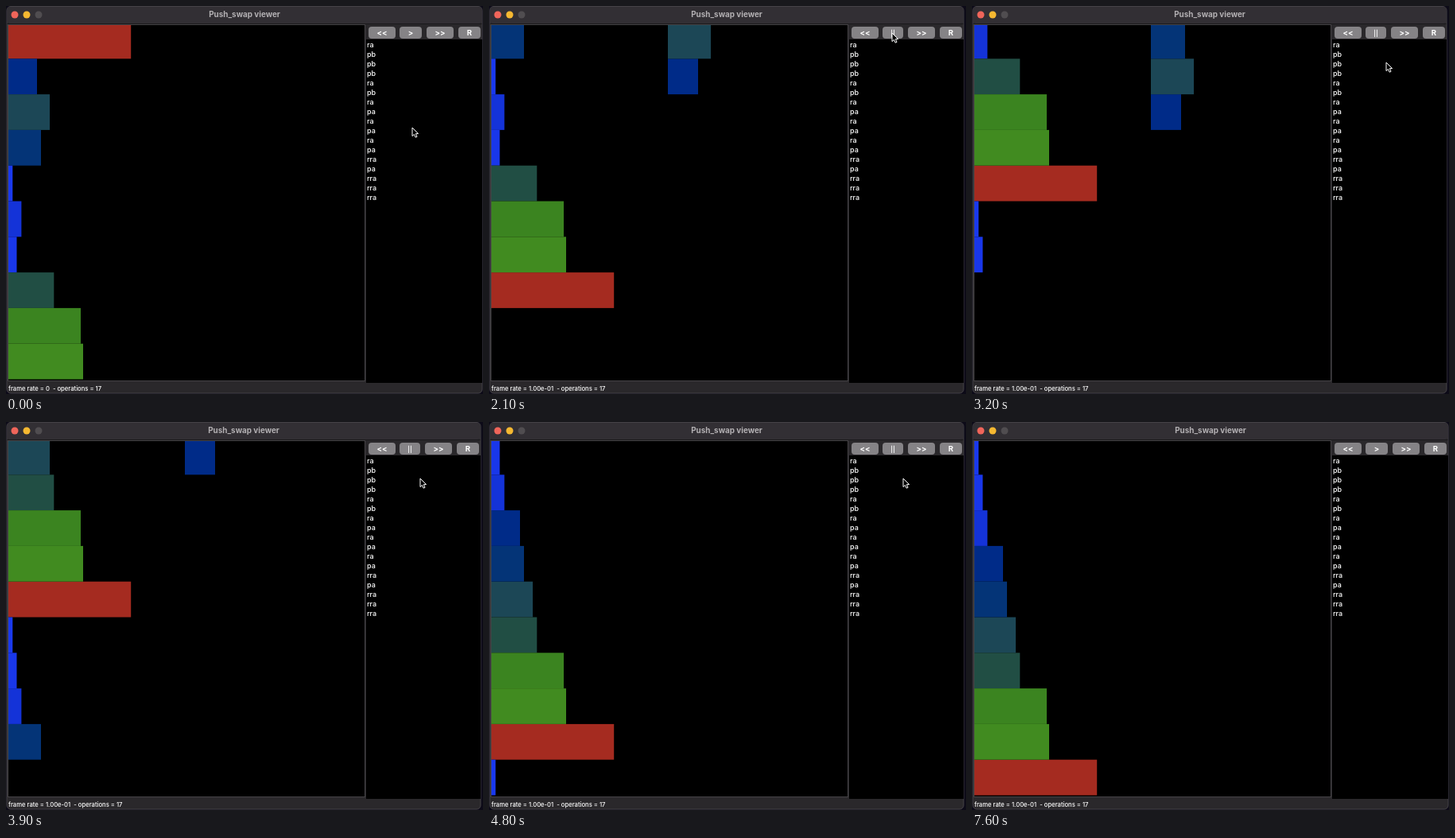
Recreate the animation shown at these times as an HTML page. Size 600x488 px, loop 7700 ms.

```html
<!DOCTYPE html>
<html lang="en">
<head>
<meta charset="utf-8">
<title>Push_swap viewer</title>
<style>
  html, body { margin: 0; width: 100%; height: 100%; overflow: hidden; background: #0d0b18; }
  svg { display: block; width: 600px; height: 488px; }
  text { font-family: Inter, Roboto, sans-serif; fill: #fff; white-space: pre; }
  .title { font-size: 9.9px; font-weight: 700; fill: #b3b0b3; text-anchor: middle; }
  .label { font-size: 9.6px; font-weight: 700; text-anchor: middle; }
  .pause { font-size: 7.8px; font-weight: 600; }
  .op { font-size: 9px; font-weight: 500; }
  .status { font-size: 7.65px; font-weight: 500; }
</style>
</head>
<body>
<svg id="stage" viewBox="0 0 600 488"></svg>
<script>
const LOOP = 7700, STEP = 100;
const CLICK = 1500, DONE = 4930;
const FIRST_OP = 1560, OP_GAP = 210;
const ROW = 44.8;

// Bar width and colour, in starting order from the top.
const BARS = [
  [156.2, '#a52b20'], [38, '#002b88'], [54, '#1c4756'], [43, '#043477'], [7.3, '#1a39ee'],
  [18.4, '#1433d8'], [12.5, '#1937ea'], [59.3, '#214e44'], [93, '#3b8420'], [96, '#418b20']
];
const OPS = 'ra pb pb pb ra pb ra pa ra pa ra pa rra pa rra rra rra'.split(' ');

// Cursor path: time, x, y.
const CURSOR = [
  [0, 511, 153], [300, 511, 153], [1000, 507, 34], [2300, 507, 34],
  [2900, 521, 71], [5500, 521, 71], [6200, 540, -16], [LOOP, 540, -16]
];

const stage = document.getElementById('stage');

function add(tag, attrs, parent = stage, text) {
  const el = document.createElementNS('http://www.w3.org/2000/svg', tag);
  set(el, attrs);
  if (text) el.textContent = text;
  return parent.appendChild(el);
}
function set(el, attrs) {
  for (const k in attrs) el.setAttribute(k, attrs[k]);
}
function box(x, y, width, height, fill, more) {
  return add('rect', { x, y, width, height, fill, ...more });
}

// Every state of the two stacks, one per operation.
function runOps() {
  let a = BARS.map((_, i) => i), b = [];
  const states = [{ a, b }];
  for (const op of OPS) {
    a = [...a];
    b = [...b];
    if (op === 'ra') a.push(a.shift());
    if (op === 'rra') a.unshift(a.pop());
    if (op === 'pb') b.unshift(a.shift());
    if (op === 'pa') a.unshift(b.shift());
    states.push({ a, b });
  }
  return states;
}
const states = runOps();

// Window frame
const frame = box(1, 0.5, 598, 486.5, '#2a282b', { rx: 5, stroke: '#454247' });
const titleBar = box(1.5, 1, 597, 21, '#322f34', { rx: 4 });
const titleLine = box(1.5, 22, 597, 1, '#1a191b');
['#f0655a', '#f5b831', '#504d50'].forEach((fill, i) =>
  add('circle', { cx: 11 + 15 * i, cy: 11, r: 4.5, fill }));
const title = add('text', { y: 14.3, class: 'title' }, stage, 'Push_swap viewer');

// Stack view and its bars
box(2, 23, 450, 449, '#454346');
box(3, 24, 448, 447, '#000');
const clip = add('clipPath', { id: 'view' });
add('rect', { x: 3, y: 24, width: 448, height: 447 }, clip);
const barLayer = add('g', { 'clip-path': 'url(#view)' });
const bars = BARS.map(([width, fill]) =>
  add('rect', { width, height: ROW, fill }, barLayer));

// Operation list
const list = box(453, 42, 146, 432, '#000');
OPS.forEach((op, i) => add('text', { x: 454, y: 52 + 12 * i, class: 'op' }, stage, op));

const buttons = ['<<', '>', '>>', 'R'].map(name => ({
  face: box(0, 26, 0, 15, '#858386', { rx: 4 }),
  label: add('text', { y: 37, class: 'label' }, stage, name)
}));
const status = add('text', { x: 3, y: 484, class: 'status' });

const cursor = add('path', {
  d: 'M0 0V10.6L2.5 8.4L4.1 12.2L6 11.4L4.4 7.6H7.6Z',
  fill: '#000', stroke: '#fff', 'stroke-width': 1, 'stroke-linejoin': 'round'
});

// The window is two pixels narrower while the pause button shows.
function layout(playing) {
  const shrink = playing ? 2 : 0;
  const spans = [[456, 34], [495, 28 - shrink], [529 - shrink, 34], [569 - shrink, 28]];
  spans.forEach(([x, width], i) => {
    set(buttons[i].face, { x, width });
    set(buttons[i].label, { x: x + width / 2 });
  });
  const play = buttons[1].label;
  play.textContent = playing ? '||' : '>';
  play.classList.toggle('pause', playing);
  set(frame, { width: 598 - shrink });
  set(titleBar, { width: 597 - shrink });
  set(titleLine, { width: 597 - shrink });
  set(list, { width: 146 - shrink });
  set(title, { x: 300 - shrink / 2 });
}

function placeStack(stack, x) {
  stack.forEach((id, row) => set(bars[id], { x, y: 21.5 + ROW * row }));
}

function cursorAt(t) {
  const i = CURSOR.findIndex(p => p[0] > t);
  const [t0, x0, y0] = CURSOR[i - 1], [t1, x1, y1] = CURSOR[i];
  const u = (t - t0) / (t1 - t0);
  const k = u * u * (3 - 2 * u);
  return [x0 + (x1 - x0) * k, y0 + (y1 - y0) * k];
}

function draw(now) {
  const t = Math.floor((now % LOOP) / STEP) * STEP;
  const done = Math.floor((t - FIRST_OP) / OP_GAP) + 1;
  const { a, b } = states[Math.max(0, Math.min(OPS.length, done))];
  placeStack(a, 1);
  placeStack(b, 225);
  layout(t >= CLICK && t < DONE);
  const rate = t >= CLICK ? '1.00e-01' : '0';
  status.textContent = `frame rate = ${rate}  - operations = ${OPS.length}`;
  set(cursor, { transform: `translate(${cursorAt(t)})` });
}

function tick() {
  draw(performance.now());
  requestAnimationFrame(tick);
}
tick();
</script>
</body>
</html>
```
